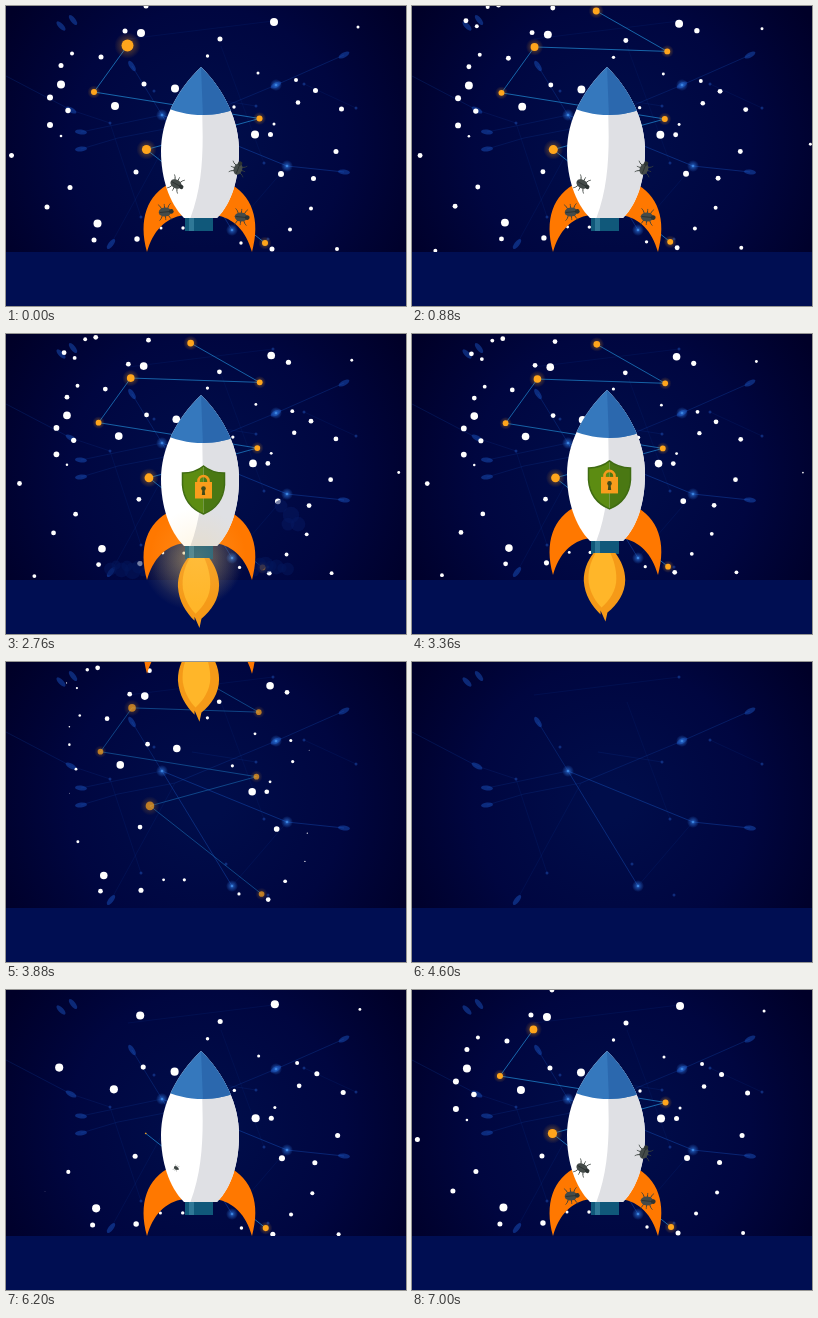
These frames come from a looping animation (400x300 px, 7.04 s). An HTML page with a canvas:

```html
<!DOCTYPE html>
<html lang="en">
<head>
<meta charset="utf-8">
<title>Rocket launch</title>
<style>
html, body { margin: 0; width: 100%; height: 100%; overflow: hidden; background: #000030; }
canvas { display: block; }
</style>
</head>
<body>
<canvas id="stage" width="400" height="300"></canvas>
<script>
const ctx = document.getElementById('stage').getContext('2d');
const LOOP = 7040, FLOOR = 246, TAU = Math.PI * 2;

const ramp = (t, a, b) => Math.min(1, Math.max(0, (t - a) / (b - a)));
const pop = x => x < .5 ? 3 * x : 2 - x;

// Flat triples: x, y, radius
const stars = [
  268,16,4, 135,27,4, 55,78.5,4, 169,82.5,4, 109,100,4, 249,128.5,4, 91.5,217.5,4,
  352,21,1.5, 119,25,2.5, 214,33,2.5, 201.5,50,1.7, 66,47.5,2, 55,59.5,2.5, 95,51,2.5,
  138,78,2.5, 44,91.5,3, 62,104.5,2.7, 44,119,3, 55,130,1.3, 5.5,149.5,2.5,
  252,67,1.5, 309.5,84.5,2.5, 290,74,2, 292,96.5,2.3, 228,101,1.7, 335.5,103,2.5,
  264.5,128.5,2.5, 268,118,1.5, 130,166,2.5, 330,145.5,2.5, 307.5,172.5,2.5,
  275,168,3, 64,181.5,2.5, 41,201,2.5, 305,202.5,2, 284,223.5,2, 88,234,2.5,
  131,233,2.7, 155,222,1.5, 177,222,1.7, 235,237,1.7, 266,243,2.5, 331,243,2
];
const lateStars = [52,13,2.5, 74,-1,2, 85,-3,2.5, 63,18.5,2, 286,23,2.7, 140,0,2.5, 401,138,1.5, 21,246,2];

// Constellation joints: x, y, radius, moment of appearance
const joints = [
  [259, 237, 3, -1100], [140.5, 143.5, 4.6, -850], [253.5, 112.5, 3, -600],
  [88, 86, 3, -350], [121.5, 39.5, 4, -110], [256, 44, 3, 300], [184, 3, 3.5, 600]
];

const webLines = [
  [126, 60, 156, 109, .5], [156, 109, 281, 160, .8], [281, 160, 338, 166, .7],
  [156, 109, 226, 224, .75], [270, 79, 338, 49, .5], [270, 79, 169, 121, .4],
  [169, 121, 112, 132, .3], [112, 132, 75, 143, .3], [75, 126, 156, 109, .3],
  [0, 70, 65, 104, .35], [65, 104, 104, 117, .25], [104, 117, 135, 211, .2],
  [122, 33, 267, 15, .2], [105, 238, 169, 121, .2], [226, 224, 281, 160, .2],
  [298, 78, 350, 102, .2], [186, 90, 250, 100, .25], [215, 40, 258, 157, .15]
];
// x, y, angle
const flares = [
  [65, 104, .5], [75, 126, .1], [75, 143, -.1], [338, 166, .1], [338, 49, -.5],
  [105, 238, -.9], [126, 60, 1], [270, 79, -.5], [55, 20, .8], [67, 14, .9]
];

function disc(x, y, r, color) {
  ctx.fillStyle = color;
  ctx.beginPath();
  ctx.arc(x, y, Math.max(0, r), 0, TAU);
  ctx.fill();
}

function line(x1, y1, x2, y2, color, width) {
  ctx.strokeStyle = color;
  ctx.lineWidth = width;
  ctx.beginPath();
  ctx.moveTo(x1, y1);
  ctx.lineTo(x2, y2);
  ctx.stroke();
}

function shape(d, color) {
  ctx.fillStyle = color;
  ctx.fill(new Path2D(d));
}

function halo(x, y, r, rgb, alpha) {
  const g = ctx.createRadialGradient(x, y, 0, x, y, r);
  g.addColorStop(0, `rgba(${rgb},${alpha})`);
  g.addColorStop(1, `rgba(${rgb},0)`);
  disc(x, y, r, g);
}

function backdrop() {
  const g = ctx.createRadialGradient(200, 140, 20, 200, 140, 235);
  g.addColorStop(0, '#000d4a');
  g.addColorStop(.55, '#000640');
  g.addColorStop(1, '#000028');
  ctx.fillStyle = g;
  ctx.fillRect(0, 0, 400, 300);
  for (const [a, b, c, d, k] of webLines) line(a, b, c, d, `rgba(24,84,190,${k * .7})`, .8);
  for (const [x, y, angle] of flares) {
    ctx.fillStyle = 'rgba(24,80,185,.5)';
    ctx.beginPath();
    ctx.ellipse(x, y, 6, 2.5, angle, 0, TAU);
    ctx.fill();
  }
  for (const [x, y] of [[156, 109], [281, 160], [226, 224], [270, 79]]) {
    halo(x, y, 6, '50,130,240', .7);
    disc(x, y, 1.3, '#3b82dc');
  }
  for (const [x, y] of [[104, 117], [135, 211], [250, 100], [298, 78], [267, 15], [258, 157], [148, 85], [220, 202], [350, 102], [262, 233]])
    disc(x, y, 1.5, 'rgba(30,80,180,.5)');
}

function starField(list, u, birth) {
  for (let i = 0; i < list.length; i += 3) {
    const x = list[i], y = list[i + 1], r = list[i + 2];
    const born = birth(x, y, r);
    const end = 4400 - 5 * Math.abs(x - 180);
    disc(x, y, r * ramp(u, born, born + 120) * (1 - ramp(u, end, end + 160)), '#fff');
  }
}

function constellation(u) {
  ctx.globalAlpha = 1 - ramp(u, 3700, 4250);
  joints.slice(1).forEach(([x, y, , born], i) => {
    const [px, py] = joints[i], k = ramp(u, born - 160, born);
    if (k) line(px, py, px + (x - px) * k, py + (y - py) * k, '#1b72b8', .9);
  });
  for (const [x, y, r, born] of joints) {
    const size = r * pop(ramp(u, born, born + 220));
    if (size > 0) halo(x, y, size * 2.2, '255,160,20', .45);
    disc(x, y, size, '#ffa51c');
  }
  ctx.globalAlpha = 1;
}

function sky(u) {
  ctx.save();
  const zoom = 1 - .0000149 * u;
  ctx.translate(200, 150);
  ctx.scale(zoom, zoom);
  ctx.translate(-200, -150);
  constellation(u);
  starField(stars, u, (x, y, r) => r === 4 ? -2320 + x : -1960 + 4.5 * Math.hypot(x - 285, y - 235));
  starField(lateStars, u, x => x === 140 ? -200 : 60 + x * 1.5);
  ctx.restore();
}

function smoke(t) {
  const k = ramp(t, 2300, 2800), fade = 1 - ramp(t, 2850, 3300);
  if (!k || !fade) return;
  ctx.globalAlpha = .55 * fade;
  for (let i = 0; i < 7; i++) {
    const x = 60 + 6 * i, r = 5 + i * 37 % 5;
    disc(193 - x * k, 238 - i * 23 % 9, r * k, '#04155a');
    disc(193 + x * k, 238 - i * 17 % 9, r * k, '#04155a');
  }
  for (const [x, y, r] of [[275, 169, 7], [285, 178, 9], [292, 187, 8], [282, 187, 7]])
    disc(x, y + 40 * (1 - k), r * k, '#06185e');
  ctx.globalAlpha = 1;
}

function flame(t) {
  const k = ramp(t, 2200, 2560);
  if (!k) return;
  ctx.save();
  ctx.translate(192.5, 224);
  ctx.scale(k * (1 + .02 * Math.sin(t / 45)), k * (1 + .015 * Math.sin(t / 60)));
  shape('M-11 0C-18 9-21 18-21 28C-20 43-13 53-4 62L-4 58L1 69L3 60C13 52 21 41 21 27C21 17 17 8 11 0Z', '#f59a18');
  shape('M-9 0C-15 10-17 20-16 30C-14 42-8 50-3 55C5 48 12 38 12 26C12 15 9 7 6 0Z', '#ffb629');
  ctx.restore();
}

const BODY = 'M195 61C170 85 155 115 155 145C155 172 163 197 178 212H211C226 197 233 172 233 145C233 115 219 85 195 61Z';
const FIN = 'M165 177C141 188 132 214 141 246C147 225 159 212 178 209Z';

function shield(t) {
  const k = pop(ramp(t, 1350, 1600)) ;
  if (k <= 0) return;
  ctx.save();
  ctx.translate(197.5, 156);
  ctx.scale(k, k);
  const half = 'M0-24C-6-19-13-17-21-17V-5C-20 9-12 19 0 24Z';
  shape(half, '#5c8c12');
  ctx.save();
  ctx.scale(-1, 1);
  shape(half, '#4a7813');
  ctx.restore();
  ctx.strokeStyle = '#3f6b12';
  ctx.lineWidth = 1.5;
  ctx.stroke(new Path2D('M0-24C-6-19-13-17-21-17V-5C-20 9-12 19 0 24C12 19 20 9 21-5V-17C13-17 6-19 0-24Z'));
  ctx.strokeStyle = '#f59a1c';
  ctx.lineWidth = 2.6;
  ctx.stroke(new Path2D('M-5-7V-9A5 5 0 0 1 5-9V-7'));
  ctx.fillStyle = '#f99d1c';
  ctx.fillRect(-8.5, -8, 17, 16.5);
  disc(0, -1.5, 2.3, '#3f4a1a');
  ctx.fillRect(0, 0, 0, 0);
  shape('M-1-1H1L1.7 5H-1.7Z', '#3f4a1a');
  ctx.restore();
}

function bug(x, y, angle, size, k) {
  if (k <= 0) return;
  ctx.save();
  ctx.translate(x, y);
  ctx.rotate(angle);
  ctx.scale(size * k, size * k);
  for (const side of [-1, 1])
    for (let i = -1; i <= 1; i++) {
      line(i * 3, side * 3, i * 5, side * 7, '#38403c', 1);
      line(i * 5, side * 7, i * 7, side * 9, '#38403c', .8);
    }
  ctx.fillStyle = '#444b49';
  ctx.beginPath();
  ctx.ellipse(0, 0, 7, 5, 0, 0, TAU);
  ctx.fill();
  disc(7, 0, 2.6, '#2d3433');
  line(-6, 0, 5, 0, '#252b2b', .8);
  ctx.restore();
}

function rocket(t, u) {
  shape(FIN, '#ff7800');
  ctx.save();
  ctx.translate(387, 0);
  ctx.scale(-1, 1);
  shape(FIN, '#ff7800');
  ctx.restore();

  ctx.fillStyle = '#10587a';
  ctx.fillRect(179, 211, 28, 14);
  ctx.fillStyle = '#2f7897';
  ctx.fillRect(183, 211, 5, 14);

  ctx.save();
  ctx.clip(new Path2D(BODY));
  shape('M150 60H240V214H150Z', '#fff');
  shape('M195 60C195 110 203 165 184 213H240V60Z', '#dfe0e4');
  const nose = 'M150 55H240V98C214 113 177 113 150 96Z';
  shape(nose, '#3578bd');
  ctx.clip(new Path2D(nose));
  shape('M195 60L197 112H240V60Z', '#2b68ae');
  ctx.restore();

  shield(t);
  const out = 1 - ramp(u, 1150, 1400);
  [[170, 178, .5, .85], [232, 163, -1.2, .85], [159, 206, -.1, .9], [235, 211, .1, .9]]
    .forEach(([x, y, a, s], i) => bug(x, y, a, s, out * ramp(u, -900 + i * 120, -740 + i * 120)));
  flame(t);
}

// Rocket offset and tilt
function pose(t) {
  if (t < 4640) return [0, -5 * Math.pow(Math.max(0, t - 3160) / 200, 3), 0];
  const far = Math.pow(1 - ramp(t, 5060, 5360), 2);
  const rest = ramp(t, 5360, 5680);
  const lift = 1 - rest * rest * (3 - 2 * rest);
  return [6 * lift + 250 * far, -9.5 * lift + 300 * far, -.5 * far];
}

function draw(t) {
  // The sky starts its cycle before the loop point.
  const u = t > 4640 ? t - LOOP : t;
  backdrop();
  sky(u);
  smoke(t);
  ctx.fillStyle = '#000e52';
  ctx.fillRect(0, FLOOR, 400, 300 - FLOOR);

  const glow = ramp(t, 1480, 1800) * (1 - ramp(t, 2950, 3300));
  if (glow) halo(186, 226, 50, '205,180,110', .5 * glow);

  const streak = ramp(t, 5240, 5340) * (1 - ramp(t, 5360, 5460));
  if (streak) {
    ctx.globalAlpha = .24 * streak;
    shape('M250 188C285 202 325 235 317 286C304 262 280 248 256 234Z', '#d35f20');
    ctx.globalAlpha = 1;
  }

  if (t < 4200 || t > 5060) {
    const [dx, dy, tilt] = pose(t);
    ctx.save();
    ctx.translate(194 + dx, 150 + dy);
    ctx.rotate(tilt);
    ctx.translate(-194, -150);
    rocket(t > 4640 ? 0 : t, u);
    ctx.restore();
  }
  if (glow) halo(192, 222, 48, '255,210,120', .22 * glow);
}

const start = performance.now();
function tick() {
  draw((performance.now() - start) % LOOP);
  requestAnimationFrame(tick);
}
tick();
</script>
</body>
</html>
```
